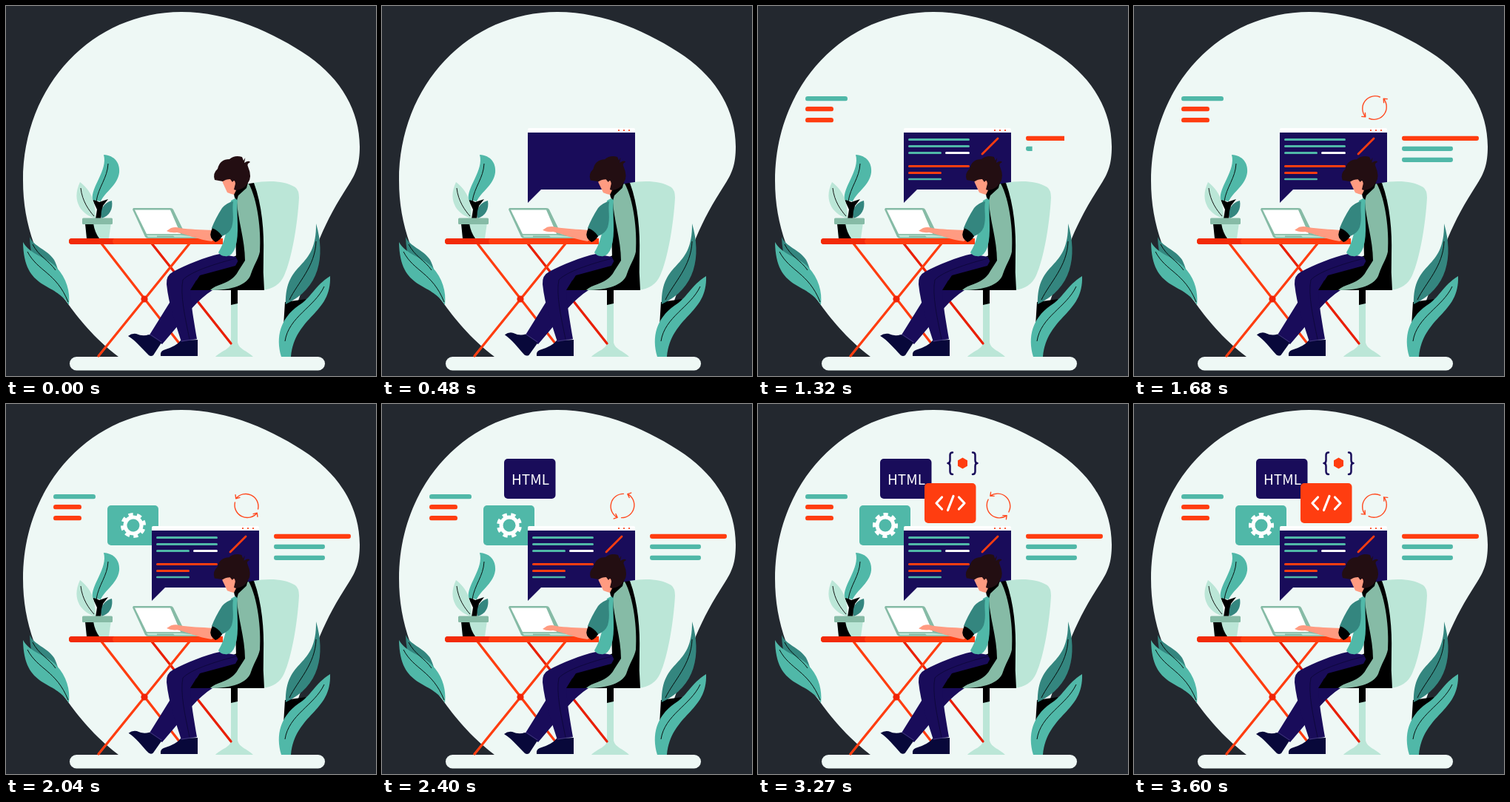
Animation of 500x500 px, one loop 4110 ms. Source, as an HTML page:

```html
<!DOCTYPE html>
<html lang="en">
<head>
<meta charset="utf-8">
<title>Working at a desk</title>
<style>
  html, body { margin: 0; height: 100%; overflow: hidden; background: #23282f; }
  svg { display: block; width: 100vw; height: 100vh; }
  .pale { fill: #eef8f5; } .mint { fill: #bbe6d7; } .sage { fill: #86bba6; }
  .teal { fill: #50b8a8; } .deep { fill: #34867f; } .navy { fill: #190c5a; }
  .red { fill: #ff3d10; } .skin { fill: #ff9b81; } .white { fill: #fff; }
  .shoe { fill: #08083a; } .hair { fill: #230e12; }
  .line { fill: none; stroke-linecap: round; stroke-linejoin: round; }
  .vein { fill: none; stroke: #000; stroke-width: .9; }
  text { font: 19px "Noto Sans CJK JP", "Noto Sans CJK SC", sans-serif; text-anchor: middle; }
</style>
</head>
<body>
<svg viewBox="0 0 500 500">
  <path class="pale" d="M152 474C119 449 97 421 82 400C43 350 23 296 23 236C23 106 118 8 237 8C301 8 362 36 409 68C453 99 478 142 478 190C478 214 473 226 464 240C446 268 435 288 424 314L384 430V474Z"/>

  <g id="cards">
    <g id="gearCard">
      <rect class="teal" x="137" y="137" width="69" height="54" rx="5"/>
      <g id="gear" fill="none" stroke="#fff">
        <circle cx="172" cy="164" r="11" stroke-width="5"/>
        <circle cx="172" cy="164" r="14.5" stroke-width="5" pathLength="80" stroke-dasharray="5.4 4.6" stroke-dashoffset="2.7"/>
      </g>
    </g>
    <g id="htmlCard">
      <rect class="navy" x="165" y="74" width="69.500" height="54" rx="5"/>
      <text class="white" x="200.500" y="109">HTML</text>
    </g>
    <g id="braces">
      <path class="line" stroke="#190c5a" stroke-width="2.500" d="M263 65.500Q259.500 65.500 259.500 69V76Q259.500 80 256.500 80Q259.500 80 259.500 84V91Q259.500 95 263 95M290 65.500Q293.500 65.500 293.500 69V76Q293.500 80 296.500 80Q293.500 80 293.500 84V91Q293.500 95 290 95"/>
      <path class="red" d="M276.500 72.500L283 76.200V83.800L276.500 87.500L270 83.800V76.200Z"/>
    </g>
    <g id="codeCard">
      <rect class="red" x="225" y="107" width="69.500" height="54" rx="5"/>
      <path class="line" stroke="#fff" stroke-width="3.200" d="M248.500 126L241 134L248.500 142M264 124.500L256.500 143.500M271.500 126L279 134L271.500 142"/>
    </g>
    <g id="sync" class="line" stroke="#ff4a20" stroke-width="1.400">
      <g id="arc">
        <path d="M317.700 152A17 17 0 0 0 337.200 125.300M342.300 125.600L337.200 125.300L337.600 130.600"/>
      </g>
      <use href="#arc" transform="rotate(180 325 137.500)"/>
    </g>
    <g id="window">
      <path class="white" d="M197 172V167Q197 165 199 165H340Q342 165 342 167V172Z"/>
      <path class="navy" d="M197 171H342V248H215L197 266Z"/>
      <g class="red"><circle cx="320" cy="168" r="1.100"/><circle cx="327" cy="168" r="1.100"/><circle cx="334" cy="168" r="1.100"/></g>
    </g>
    <g id="bars"></g>
    <path id="slash" class="line" stroke="#ff3d10" stroke-width="2.800" pathLength="1" d="M303 200L324 179"/>
  </g>

  <!-- potted plant -->
  <path d="M116 260L126 265L138 261L131 270L128 288H121L123 275Z"/>
  <path class="teal" d="M132 201C147 202 154 212 153 225C151 242 134 251 128 264L117 262C114 245 138 222 132 201Z"/>
  <path class="mint" d="M100 238C116 250 121 266 121 287C104 283 87 265 100 238Z"/>
  <path class="deep" d="M143 263C145 274 140 284 129 287C127 274 132 266 143 263Z"/>
  <path class="vein" d="M138 213C137 233 125 244 122 264M101 246C103 264 112 276 119 284"/>
  <path class="mint" d="M107 293H142L139 314H109Z"/>
  <path d="M107 294H118Q120 306 126 314H109Z"/>
  <rect class="sage" x="103" y="286.500" width="41" height="8.500" rx="1.500"/>

  <!-- ground plants -->
  <path class="deep" d="M32 312C37 325 56 329 65 343C74 360 72 378 84 398C66 386 33 366 32 312Z"/>
  <path class="teal" d="M23 319C33 337 54 338 68 353C82 368 87 386 85 404C67 372 24 386 23 319Z"/>
  <path class="vein" d="M29 332C43 359 68 360 84 400M36 322C44 338 58 344 67 357"/>
  <path d="M377 400L406 396L400 407L375 432Z"/>
  <path class="deep" d="M419 294C432 338 424 382 378 403C377 342 420 359 419 294Z"/>
  <path class="teal" d="M438 365C440 417 391 418 385 474H372C364 447 371 422 395 405C412 395 417 378 438 365Z"/>
  <path class="vein" d="M419 318C418 352 394 374 383 397M430 379C417 407 382 420 377 453"/>

  <rect class="pale" x="86" y="474" width="345" height="18.500" rx="9.200"/>

  <!-- chair -->
  <path class="mint" d="M334 239C352 236 375 235 391 245Q396 249 396 259C394 296 386 342 376 364Q368 382 346 384Z"/>
  <path d="M322 241L335 239C346 268 349 306 348 335Q347 360 349 384H249L262 360L316 335Z"/>
  <path d="M304 384H313V404H304Z"/>
  <path class="mint" d="M304 404L313 402V455C315 464 326 466 334 474H283C291 466 303 464 304 455Z"/>

  <!-- table -->
  <g class="line" stroke-width="3.300" stroke-linecap="butt">
    <path stroke="#e91f05" d="M197 321L304 456"/>
    <path stroke="#ff3d10" d="M129 321L235 457M248 321L125 473"/>
  </g>
  <circle cx="187" cy="396" r="4.600" fill="#f02407"/>
  <path class="red" d="M89 314H293V322H89A4 4 0 0 1 89 314Z"/>
  <path fill="#f22a08" d="M89 314H146Q142 318 146 322H89A4 4 0 0 1 89 314Z"/>

  <!-- laptop -->
  <path class="sage" d="M172 273H222Q225 273 226 275L242 308L262 311V314H192Q189 314 188 312L171 275Z"/>
  <path class="white" d="M174 275.500H222L236 308H190Z"/>
  <path class="mint" d="M190 309.500H236L261 312.500H192Z"/>
  <path class="sage" d="M204 310.500H226L228 312.500H204Z"/>

  <!-- legs -->
  <path class="navy" d="M279 384C259 397 246 414 234 430L211 457L193 446L221 401L250 370Z"/>
  <g id="foot"><path class="shoe" d="M165 446Q170 442 176 443Q185 447 193 444L210 455L199 472Q196 474 193 472C184 463 175 452 165 446Z"/></g>
  <path class="shoe" d="M236 452L259 451V473H209Q208 467 213 465Q230 460 236 452Z"/>
  <path class="navy" d="M289 335C269 339 243 350 226 359Q216 364 217 376C220 405 230 431 237 454L258 450C254 426 250 405 249 384L262 364L310 351L316 340Z"/>
  <path class="line" stroke="#0b0630" stroke-width=".7" d="M311 341C280 349 250 359 239 370C235 390 242 421 248 450"/>
  <path class="line" stroke="#5b5590" stroke-width=".6" d="M195 444L210 454M237 453L257 450"/>

  <!-- torso -->
  <path d="M309 262L324 250L330 330L322 346L311 354L278 363L257 371L249 384H282L322 362L311 340Z"/>
  <path class="sage" d="M312 264Q315 244 328 240C340 262 345 303 343 332C341 342 335 350 331 362C327 377 305 384 276 384Q281 379 291 376C305 371 311 364 314 358L323 344C323 316 313 288 312 264Z"/>
  <path class="teal" d="M313 258C311 285 316 307 310 326Q305 340 296 338Q290 338 287 333C300 312 300 286 304 263Z"/>
  <g id="arm">
    <path class="skin" d="M280 303C263 302 248 302 235 300Q229 298 223 300L217 304Q222 307 231 306C246 309 260 316 278 318L291 308Z"/>
  </g>
  <path d="M279 299L294 307Q290 317 283 319Q274 313 277 305Z"/>
  <path class="deep" d="M307 264Q298 266 292 273C286 282 281 292 278 300Q287 303 292 311Q302 307 305 299C309 286 305 276 307 264Z"/>

  <!-- head -->
  <g id="head">
    <path d="M307 250L309 259L312 262L314 256L325 246L328 234L310 232Z"/>
    <path class="skin" d="M291 232L293 239L299 252Q304 254 308 255L312 247L314 236L306 229Z"/>
    <path class="hair" d="M282 235Q279 226 286 220Q289 207 302 207Q309 201 319 204L321 209Q324 203 323 207L322 212Q328 208 330 211Q325 213 327 217Q333 231 327 239Q322 248 311 249L308 248L310 240Q309 233 306 238L303 234Q297 234 293 237Z"/>
  </g>
</svg>
<script>
const STEP = 30, ACTIVE = 3600, LOOP = 4110, SPIN = -0.28;
const $ = id => document.getElementById(id);
const progress = (t, start, length) => Math.min(1, Math.max(0, (t - start) / length));
const easeOut = p => 1 - (1 - p) ** 3;

// x, y, width, height, colour, start, duration
const bars = [
  [203, 179, 83, 3, "teal", 480, 120],
  [203, 188, 83, 3, "teal", 540, 120],
  [203, 197, 45, 3, "teal", 600, 120],
  [253, 197, 33, 3, "white", 660, 120],
  [203, 215, 83, 3, "red", 720, 120],
  [203, 224, 45, 3, "red", 780, 120],
  [203, 232.5, 45, 3, "teal", 840, 120],
  [64, 122, 57, 6.5, "teal", 930, 210],
  [64, 136, 38, 6.5, "red", 1020, 210],
  [64, 151, 38, 6.5, "red", 1110, 210],
  [362, 175.5, 104, 6.5, "red", 1200, 240],
  [362, 189.5, 69, 6.5, "teal", 1290, 240],
  [362, 204.5, 69, 6.5, "teal", 1380, 240],
].map(([x, y, width, height, colour, start, length]) => {
  const node = document.createElementNS("http://www.w3.org/2000/svg", "rect");
  const attrs = { x, y, width, height, rx: height / 2, class: colour };
  for (const key in attrs) node.setAttribute(key, attrs[key]);
  $("bars").append(node);
  return { node, start, length };
});

const turn = (id, angle, x, y) => $(id).setAttribute("transform", `rotate(${angle} ${x} ${y})`);

function grow(id, scale, x, y, dy = 0, angle = 0) {
  $(id).setAttribute("transform",
    `translate(${x} ${y + dy}) rotate(${angle}) scale(${scale}) translate(${-x} ${-y})`);
}

function draw(t) {
  const pop = (start, length) => easeOut(progress(t, start, length));

  grow("window", pop(90, 330), 197, 266);
  for (const { node, start, length } of bars)
    node.style.clipPath = `inset(0 ${100 - 100 * progress(t, start, length)}% 0 0)`;
  const slash = progress(t, 780, 150);
  $("slash").style.strokeDasharray = `${slash} 2`;
  $("slash").style.visibility = slash ? "visible" : "hidden";

  grow("sync", pop(1410, 240), 325, 137.5, 0, SPIN * (t - 1680));
  grow("gearCard", pop(1740, 330), 171.5, 164);
  turn("gear", SPIN * (t - ACTIVE), 172, 164);
  grow("htmlCard", pop(2040, 330), 200, 101);
  grow("codeCard", pop(2400, 330), 260, 134);

  const rise = pop(2760, 500);
  $("braces").style.visibility = rise ? "visible" : "hidden";
  grow("braces", 0.75 + 0.25 * rise, 276.5, 80, 42 * (1 - rise));

  const sway = (1 - Math.cos(t / 1200 * 2 * Math.PI)) / 2;
  turn("foot", 3 * sway, 204, 463);
  turn("arm", 1.2 * sway, 284, 310);
  turn("head", -1.2 * sway, 312, 252);
}

const begin = performance.now();
function tick() {
  const t = (performance.now() - begin) % LOOP;
  draw(Math.min(ACTIVE, Math.floor(t / STEP) * STEP));
  requestAnimationFrame(tick);
}
tick();
</script>
</body>
</html>
```
